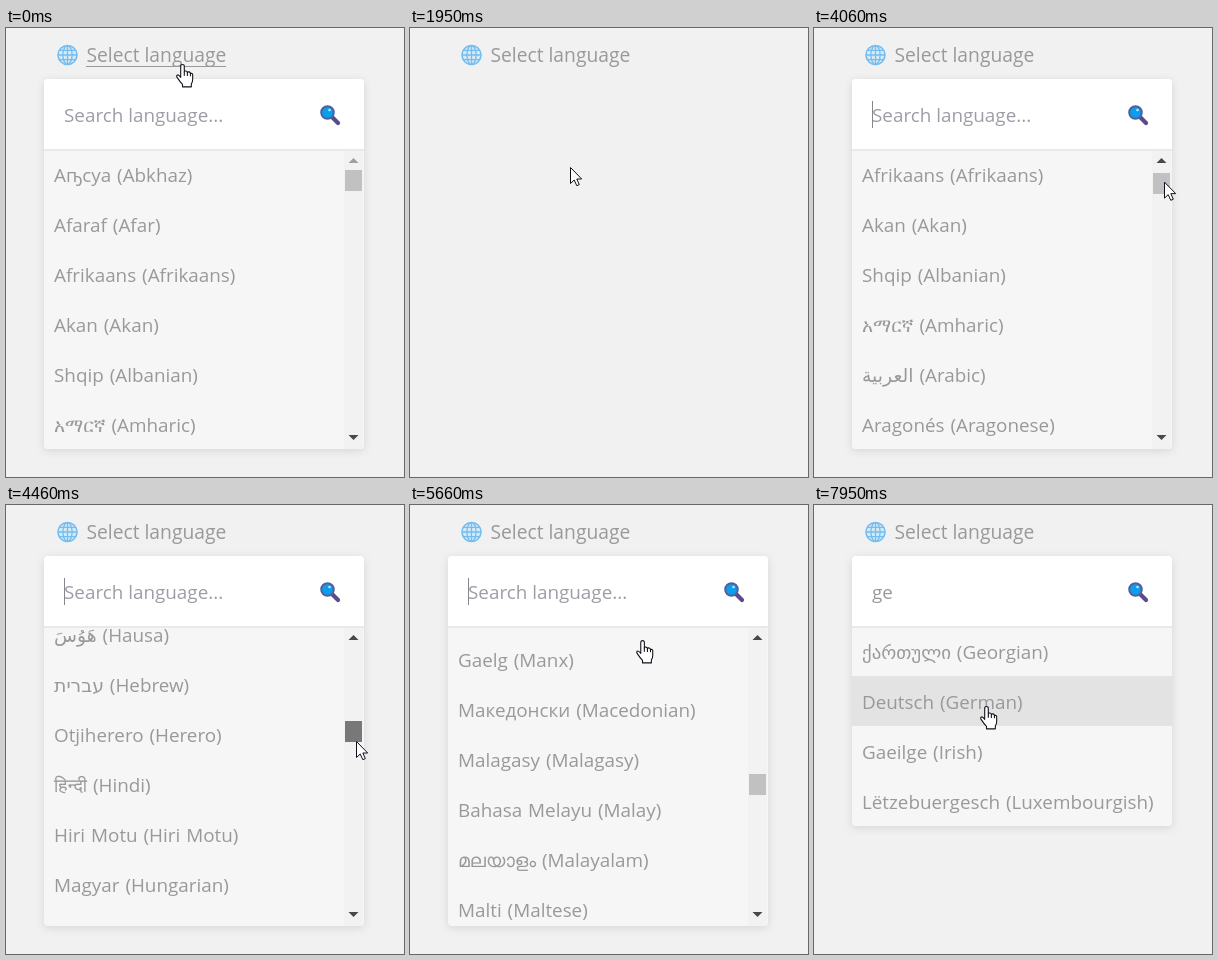
These frames come from a looping animation (398 px wide and 449 px high, 8 s). An HTML page:

```html
<!DOCTYPE html>
<html lang="en">
<head>
<meta charset="utf-8">
<title>Language picker</title>
<style>
html, body { margin: 0; width: 100%; height: 100%; overflow: hidden; background: #f1f1f1; }
svg { display: block; width: 398px; height: 449px; }
text { font: 18.85px "Open Sans", "Noto Sans", "DejaVu Sans", sans-serif; fill: #999; }
#rows { word-spacing: 1px; }
.hint { fill: #9d9da8; }
.tip { font-size: 14.5px; font-weight: 600; fill: #333; }
.soft { filter: drop-shadow(0 2px 4px rgba(0, 0, 0, .11)); }
</style>
</head>
<body>
<svg viewBox="0 0 398 449">
  <defs>
    <clipPath id="clip"><rect x="38" y="122" width="320" height="299"/></clipPath>
  </defs>
  <rect width="398" height="449" fill="#f1f1f1"/>

  <g fill="none" stroke="#74bdee" stroke-width="1.3">
    <circle cx="61.5" cy="27" r="9.5" fill="#d3eaf8" stroke-width="1.6"/>
    <ellipse cx="61.5" cy="27" rx="4.6" ry="9.4"/>
    <path d="M61.5 18V36M52.6 27H70.4M54 22.3H69M54 31.7H69"/>
  </g>
  <text x="80.5" y="34" style="font-size:19.25px">Select language</text>
  <path id="underline" d="M80 38.5H220" stroke="#999"/>

  <g id="panel">
    <rect id="card" class="soft" x="38" y="51" width="320" rx="4" fill="#f6f6f6"/>
    <g id="list" clip-path="url(#clip)">
      <rect id="hover" x="38" y="171" width="320" height="50" fill="#e3e3e3"/>
      <g id="rows"></g>
      <g id="bar">
        <rect x="338" y="122" width="19" height="299" fill="#f2f2f2"/>
        <path id="up" d="M342.5 135L347.5 130L352.5 135Z"/>
        <path d="M342.5 407L347.5 412L352.5 407Z" fill="#484848"/>
        <rect id="thumb" x="339" width="17"/>
      </g>
    </g>
    <path d="M38 122H358" stroke="#e9e9e9" stroke-width="2"/>
    <path d="M38 121V55Q38 51 42 51H354Q358 51 358 55V121Z" fill="#fff"/>
    <text id="field" x="58" y="94"></text>
    <path id="caret" d="M.5 73V100" stroke="#85858c"/>
    <path d="M326 89L332 95" stroke="#5c4b8c" stroke-width="4.2" stroke-linecap="round"/>
    <circle cx="321.5" cy="84.5" r="6.3" fill="#0a9fea" stroke="#51609f" stroke-width="2"/>
    <circle cx="323.5" cy="82" r="1.3" fill="#bfe6fa"/>
    <g id="popup">
      <path class="soft" fill="#fff" d="M168 131H181L189 122L197 131H352Q358 131 358 137V226Q358 232 352 232H168Q162 232 162 226V137Q162 131 168 131Z"/>
      <text class="tip" x="177" y="165">sp</text>
      <text class="tip" x="177" y="210">fe</text>
    </g>
  </g>

  <g id="cursor" fill="#fff" stroke="#10101c" stroke-linejoin="round">
    <path id="arrow" d="M.5 .5V16.5L4.2 13L6.8 18.7L9.3 17.6L6.8 12H11.7Z"/>
    <g id="hand" stroke-width="1.2" transform="translate(-1 .5) scale(.9 .97)">
      <path d="M-2 2Q-2 0 0 0T2 2V7.5Q2 6.5 3.7 6.7T5.4 8.3Q6 7.3 7.4 7.6T8.8 9.4Q9.6 8.8 10.6 9.3T11.3 11V15.5Q11.3 18 9.8 20V23H0V20.5Q-3 17.5-6 13.2Q-7.2 11.4-5.5 10.8Q-4.2 10.5-2 13.2Z"/>
      <path d="M2 7.5V11.5M5.4 8.3V11.8M8.8 9.4V12"/>
    </g>
    <path id="beam" fill="none" d="M-3.5-7H-1Q0-7 0-6V6Q0 7-1 7H-3.5M3.5-7H1Q0-7 0-6M3.5 7H1Q0 7 0 6"/>
  </g>
</svg>
<script>
const LOOP = 8000, STEP = 50, PHASE = 10, NS = 'http://www.w3.org/2000/svg';
const $ = id => document.getElementById(id);

// '|' marks a line break inside a row
const langs = `Аҧсуа (Abkhaz),Afaraf (Afar),Afrikaans (Afrikaans),Akan (Akan),Shqip (Albanian),አማርኛ (Amharic),
العربية (Arabic),Aragonés (Aragonese),Հայերեն (Armenian),অসমীয়া (Assamese),Авар мацӀ (Avaric),Avesta (Avestan),
Aymar aru (Aymara),Azərbaycan dili (Azerbaijani),Bamanankan (Bambara),Башҡорт теле (Bashkir),Euskara (Basque),
Беларуская (Belarusian),বাংলা (Bengali),भोजपुरी (Bihari),Bislama (Bislama),Bosanski jezik (Bosnian),
Brezhoneg (Breton),Български език (Bulgarian),ဗမာစာ (Burmese),Català (Catalan),Chamoru (Chamorro),
Нохчийн мотт (Chechen),ChiCheŵa (Chichewa),中文 (Chinese),Чӑваш чӗлхи (Chuvash),Kernewek (Cornish),
Corsu (Corsican),ᓀᐦᐃᔭᐍᐏᐣ (Cree),Hrvatski (Croatian),Česky (Czech),Dansk (Danish),ދިވެހި (Divehi),
Nederlands (Dutch),English (English),Esperanto (Esperanto),Eesti (Estonian),Eʋegbe (Ewe),Føroyskt (Faroese),
Vosa Vakaviti (Fijian),Suomi (Finnish),Français (French),Fulfulde (Fula),Galego (Galician),ქართული (Georgian),
Deutsch (German),Ελληνικά (Greek),Avañeẽ (Guaraní),ગુજરાતી (Gujarati),Kreyòl ayisyen (Haitian),هَوُسَ (Hausa),
עברית (Hebrew),Otjiherero (Herero),हिन्दी (Hindi),Hiri Motu (Hiri Motu),Magyar (Hungarian),Interlingua (Interlingua),
Bahasa Indonesia (Indonesian),Interlingue (Interlingue),Gaeilge (Irish),Igbo (Igbo),Iñupiaq (Inupiaq),Ido (Ido),
Íslenska (Icelandic),Italiano (Italian),ᐃᓄᒃᑎᑐᑦ (Inuktitut),日本語 (Japanese),Basa Jawa (Javanese),
Kalaallisut (Kalaallisut),ಕನ್ನಡ (Kannada),Kanuri (Kanuri),कश्मीरी (Kashmiri),Қазақ тілі (Kazakh),ភាសាខ្មែរ (Khmer),
Gĩkũyũ (Kikuyu),Ikinyarwanda (Kinyarwanda),Кыргыз тили (Kirghiz),Коми кыв (Komi),KiKongo (Kongo),한국어 (Korean),
Kurdî (Kurdish),Kuanyama (Kwanyama),Latine (Latin),Lëtzebuergesch (Luxembourgish),Luganda (Luganda),
Limburgs (Limburgish),Lingála (Lingala),ພາສາລາວ (Lao),Lietuvių (Lithuanian),Tshiluba (Luba-Katanga),
Latviešu (Latvian),Gaelg (Manx),Македонски (Macedonian),Malagasy (Malagasy),Bahasa Melayu (Malay),
മലയാളം (Malayalam),Malti (Maltese),Te reo Māori (Māori),मराठी (Marathi),Kajin M̧ajeļ (Marshallese),
Монгол (Mongolian),Owambo (Ndonga),Norsk (Bokmål) (Norwegian|Bokmål),Norsk (Nynorsk) (Norwegian|Nynorsk)`
  .split(',').map(s => s.trim());

// One prebuilt group of rows for each search term
function buildView(term) {
  const g = document.createElementNS(NS, 'g'), tops = {};
  let y = 122;
  for (const name of langs.filter(s => s.toLowerCase().includes(term))) {
    tops[name] = y;
    name.split('|').forEach((line, i) => {
      const row = document.createElementNS(NS, 'text');
      row.setAttribute('x', 48);
      row.setAttribute('y', y + 32 + 30 * i);
      row.textContent = line;
      g.append(row);
    });
    y += 20 + 30 * name.split('|').length;
  }
  $('rows').append(g);
  return { g, tops };
}
const views = { '': buildView(''), g: buildView('g'), ge: buildView('ge') };
const gScroll = views.g.tops['Gaelg (Manx)'] - 130;

const clamp = v => Math.max(0, Math.min(1, v));
const ramp = (t, a, b) => clamp((t - a) / (b - a));

// Keys are [time, value, value...]
function track(keys, t) {
  const i = keys.findIndex(k => k[0] > t);
  if (i < 0) return keys[keys.length - 1].slice(1);
  if (i === 0) return keys[0].slice(1);
  const a = keys[i - 1], b = keys[i], p = ramp(t, a[0], b[0]);
  return a.slice(1).map((v, j) => v + (b[j + 1] - v) * p);
}

const mouse = [
  [0, 177.5, 36], [50, 177.5, 36], [350, 172, 217], [800, 172, 217], [1080, 176, 35], [1200, 176, 35],
  [1600, 165, 241], [1700, 165, 241], [1910, 160, 139], [2130, 177, 34], [2260, 177, 34], [2450, 183.5, 173],
  [3620, 183.5, 173], [4000, 350, 152], [4110, 350, 155], [4460, 350, 236], [5060, 350, 276], [5250, 350, 281],
  [5350, 350, 281], [5760, 196, 88], [5960, 196, 88], [6060, 196.5, 84.5], [7450, 196.5, 84.5], [7850, 173.5, 201]
];
const wheelAndDrag = [
  [3260, 0], [3560, 83], [3700, 100], [4110, 100], [4460, 2767], [5060, 4601], [5250, 4792]
];
const caretOn = [[50, 550], [2500, 2900], [3300, 5960], [6260, 7290]];

const set = (id, name, value) => $(id).setAttribute(name, value);
const show = (id, on) => set(id, 'visibility', on ? 'inherit' : 'hidden');
const fade = (id, v) => set(id, 'opacity', v);

function draw(t) {
  const typed = t < 6760 ? '' : t < 7000 ? 'g' : 'ge';
  const panel = t < 1700 ? 1 - ramp(t, 1150, 1300) : ramp(t, 2200, 2300);
  const list = t < 1700 ? 1 : ramp(t, 2750, 2900);
  const scroll = typed === 'ge' ? 0 : typed ? gScroll : track(wheelAndDrag, t)[0];

  fade('panel', panel);
  fade('list', list);
  set('card', 'height', typed === 'ge' ? 270 : 70 + 300 * list);
  for (const key in views) {
    views[key].g.setAttribute('display', key === typed ? 'inline' : 'none');
    views[key].g.setAttribute('transform', `translate(0 ${-Math.round(scroll)})`);
  }
  fade('hover', ramp(t, 7700, 7900));

  show('bar', typed !== 'ge');
  set('up', 'fill', scroll ? '#484848' : '#a0a0a0');
  set('thumb', 'y', typed ? 279 : Math.round(142 + scroll / 37.6));
  set('thumb', 'height', typed ? 31 : 21);
  set('thumb', 'fill', t > 4100 && t < 5350 ? '#787878' : '#c1c1c1');

  $('field').textContent = typed || 'Search language...';
  set('field', 'class', typed ? '' : 'hint');
  show('caret', caretOn.some(([a, b]) => t >= a && t < b));
  set('caret', 'transform', `translate(${58 + 11 * typed.length})`);
  fade('popup', ramp(t, 6390, 6460) * (1 - ramp(t, 6750, 6900)));

  const [x, y] = track(mouse, t);
  const open = panel > .5;
  const onLink = y < 45 && x > 80 && x < 220;
  const onField = open && y > 51 && y < 121 && x < 358;
  const onRow = open && list > .5 && y > 121 && y < 421 && x < 338;
  const kind = onField ? 'beam' : onLink || onRow ? 'hand' : 'arrow';
  for (const k of ['arrow', 'hand', 'beam']) show(k, k === kind);
  set('cursor', 'transform', `translate(${x} ${y})`);
  show('underline', onLink);
}

// The picture advances in 50 ms steps, like a 20 fps screen recording
const start = performance.now();
function tick() {
  const t = (performance.now() - start) % LOOP;
  draw(Math.max(0, Math.floor((t - PHASE) / STEP) * STEP + PHASE));
  requestAnimationFrame(tick);
}
tick();
</script>
</body>
</html>
```
